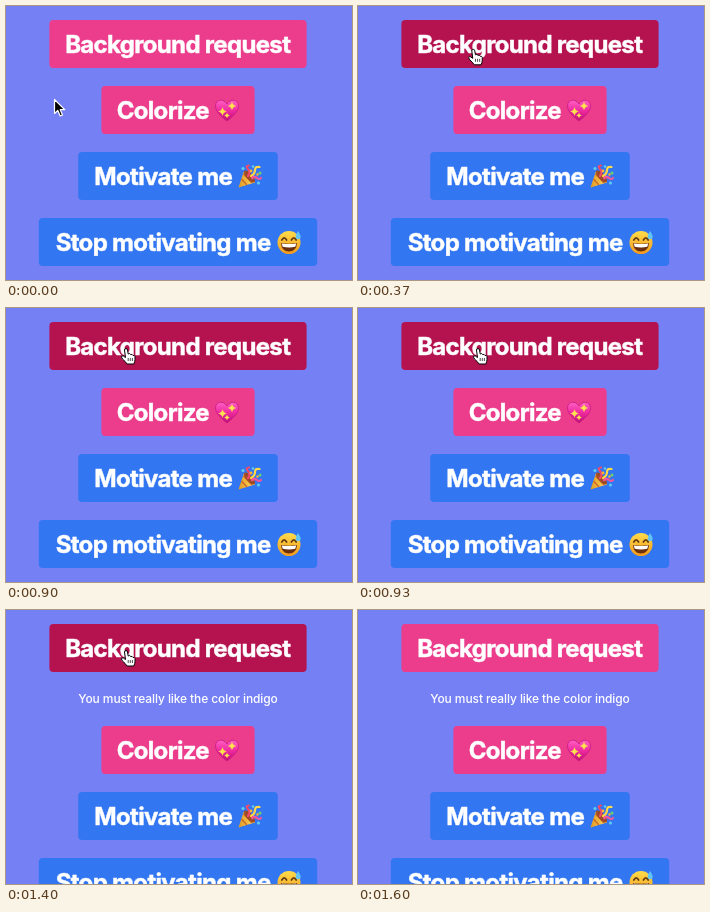
An HTML page for the animation above (1630 ms loop, 346x274 px).

```html
<!DOCTYPE html>
<html lang="en">
<head>
<meta charset="utf-8">
<style>
  html, body { margin: 0; height: 100%; overflow: hidden; background: #7580f5; }
  svg { display: block; width: 346px; height: 274px; }
  text { font-family: Inter, Roboto, sans-serif; fill: #fff; text-anchor: middle; }
  .label { font-size: 24px; font-weight: 700; letter-spacing: -.67px; stroke: #fff; stroke-width: .5px; }
  .message { font-size: 12px; font-weight: 500; letter-spacing: -.1px; }
  .pink { fill: #eb3d8b; }
  .blue { fill: #3276f2; }
</style>
</head>
<body>
<svg viewBox="0 0 346 274">
  <defs>
    <linearGradient id="heart" x2="0" y2="1"><stop stop-color="#ff5fc4"/><stop offset=".5" stop-color="#ee2a9f"/><stop offset="1" stop-color="#bd0f78"/></linearGradient>
    <linearGradient id="face" x2="0" y2="1"><stop stop-color="#ffdc4a"/><stop offset="1" stop-color="#f39a1e"/></linearGradient>
    <linearGradient id="cone"><stop stop-color="#e39a20"/><stop offset="1" stop-color="#ffd95e"/></linearGradient>
    <path id="spark" d="M0-5Q.7-.7 5 0Q.7.7 0 5Q-.7.7-5 0Q-.7-.7 0-5Z" fill="#ffe14f"/>
  </defs>

  <rect id="request" x="43.400" y="14" width="257.200" height="48" rx="4"/>
  <text class="label" x="171.700" y="47">Background request</text>
  <text id="message" class="message" x="172" y="93">You must really like the color indigo</text>

  <g id="rest">
    <rect class="pink" x="95.400" y="80" width="153.200" height="48" rx="4"/>
    <text class="label" x="156.800" y="113">Colorize</text>
    <g transform="translate(209 92)">
      <path d="M12 23C7 19 .5 14 .5 8C.5 1 9 .5 12 6C15 .5 23.500 1 23.500 8C23.500 14 17 19 12 23Z" fill="url(#heart)" stroke="#c2177f" stroke-width=".7"/>
      <use href="#spark" transform="translate(7.500 13.500)scale(.9)"/>
      <use href="#spark" transform="translate(17 8)scale(.9)"/>
      <use href="#spark" transform="translate(12 17.500)scale(.55)"/>
    </g>

    <rect class="blue" x="72.200" y="146" width="199.600" height="48" rx="4"/>
    <text class="label" x="157.200" y="179">Motivate me</text>
    <g transform="translate(232 158)">
      <path d="M.5 23.500L6 7Q15 9 17 18.500Z" fill="url(#cone)"/>
      <path d="M3.500 15L9 21M5.500 10L14 19" stroke="#c9682a" stroke-width="1.300"/>
      <ellipse cx="11.500" cy="12.500" rx="3" ry="7.600" transform="rotate(-42 11.500 12.500)" fill="#a04a26"/>
      <g fill="none" stroke-width="2.200" stroke-linecap="round">
        <path d="M10 12Q13 8 10 5T11 1.500" stroke="#ef4b6c"/>
        <path d="M13 12Q17 10 17 6T21.500 3" stroke="#ffd84a"/>
        <path d="M14 14Q17 12 19 14T23 14" stroke="#f0569b"/>
      </g>
      <g fill="#60cbf0"><circle cx="5" cy="4.500" r="1.600"/><circle cx="20.500" cy="19" r="1.600"/><circle cx="15" cy="2.500" r="1.300"/></g>
      <g fill="#6bd36a"><circle cx="22" cy="9" r="1.500"/></g>
      <g fill="#ffb52e"><circle cx="13" cy="7" r="1.400"/><circle cx="19.500" cy="10.500" r="1.200"/></g>
    </g>

    <rect class="blue" x="32.800" y="212" width="278.400" height="48" rx="4"/>
    <text class="label" x="157.200" y="245">Stop motivating me</text>
    <g transform="translate(271 224)">
      <circle cx="12" cy="12.500" r="11.500" fill="url(#face)"/>
      <path d="M4.800 10Q7.200 5.800 9.600 10M14.400 10Q16.800 5.800 19.200 10" fill="none" stroke="#643a12" stroke-width="1.700" stroke-linecap="round"/>
      <path d="M4 13Q12 14.500 20 13Q19.500 21.500 12 21.500T4 13Z" fill="#6b3010"/>
      <path d="M4.800 13.400Q12 14.800 19.200 13.400L18.300 16.800Q12 18 5.700 16.800Z" fill="#fff"/>
      <path d="M21 1Q24.500 6 23.500 8Q21 10.500 18.800 8Q18 6 21 1Z" fill="#62c4f5"/>
    </g>
  </g>

  <g id="cursor" stroke-linejoin="round">
    <path id="arrow" d="M0 0V14L3.300 11L5.700 16.500L8 15.500L5.700 10.200H10.200Z" stroke="#fff" stroke-width="1.200"/>
    <g id="hand" fill="#fff" stroke="#000">
      <path d="M-1.500 1.500Q-1.300 0 0 0Q1.300 0 1.500 1.500L2.200 5.500Q3.800 4.300 4.700 6Q6.300 5.300 7 7Q8.500 6.500 9 8V11Q9 13 7.800 15.500H1Q-.5 13-3.500 10.500Q-5.500 8-4 7.300Q-3 7-.5 9Z"/>
      <path d="M2.200 9.500V12.500M4.300 9.500V12.500M6.400 9.500V12.500" stroke-width=".7"/>
    </g>
  </g>
</svg>
<script>
  const LOOP = 1630, ARRIVE = 440, HOVER = 325, REPLY = 1020, LEAVE = 1500, RELEASE = 1570;
  const el = id => document.getElementById(id);
  const show = (id, on) => el(id).setAttribute('visibility', on ? 'visible' : 'hidden');
  const smooth = p => p * p * (3 - 2 * p);

  function draw(now) {
    const t = now % LOOP;
    const k = smooth(Math.min(t / ARRIVE, 1));
    const x = 48.5 + 71.5 * k, y = 93.5 - 53 * k ** .8;
    const visible = t < LEAVE, over = y < 62, replied = t >= REPLY;

    el('cursor').setAttribute('transform', `translate(${x} ${y})`);
    show('arrow', visible && !over);
    show('hand', visible && over);
    show('message', replied);
    el('rest').setAttribute('transform', `translate(0 ${replied ? 36 : 0})`);
    // The hover colour trails the pointer a little
    el('request').setAttribute('fill', t >= HOVER && t < RELEASE ? '#b51350' : '#eb3d8b');
    requestAnimationFrame(draw);
  }
  draw(0);
</script>
</body>
</html>
```
